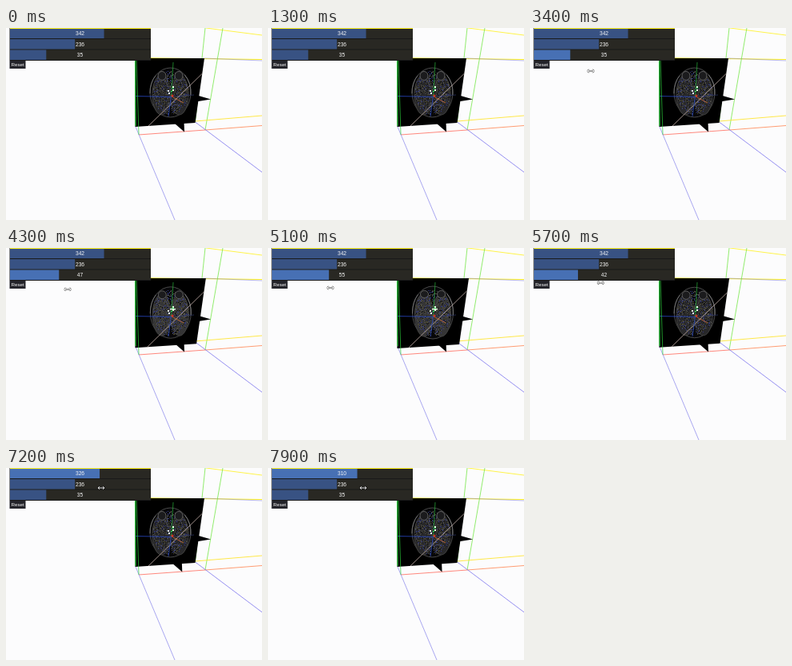
Animation, 320 px wide and 241 px high, one loop 8 s. Source, as an HTML page with a canvas:

```html
<!DOCTYPE html>
<html>
<head>
<meta charset="utf-8">
<style>
html, body { margin: 0; width: 100%; height: 100%; overflow: hidden; background: #fcfcfd; }
canvas { display: block; width: 320px; height: 241px; }
</style>
</head>
<body>
<canvas id="stage" width="320" height="241"></canvas>
<script>
const ctx = document.getElementById('stage').getContext('2d');
const LOOP = 8000;

// Keys are [time, value] pairs with linear motion between them.
function track(keys, t) {
  if (t <= keys[0][0]) return keys[0][1];
  for (let i = 1; i < keys.length; i++) {
    const [t0, a] = keys[i - 1], [t1, b] = keys[i];
    if (t <= t1) return a + (b - a) * (t - t0) / (t1 - t0);
  }
  return keys[keys.length - 1][1];
}

const sagittal = [[6500, 342], [7900, 310]];
const axial = [[3500, 35], [4800, 55], [5200, 55], [6000, 35]];
const cursorX = [[2700, 62], [3400, 76], [5100, 78], [5500, 78], [6300, 119]];
const cursorY = [[2700, 34], [3400, 54], [5100, 50], [5500, 50], [6300, 25]];

function line(color, x0, y0, x1, y1, width = 0.8) {
  ctx.strokeStyle = color;
  ctx.lineWidth = width;
  ctx.beginPath();
  ctx.moveTo(x0, y0);
  ctx.lineTo(x1, y1);
  ctx.stroke();
}

function poly(color, ...p) {
  ctx.fillStyle = color;
  ctx.beginPath();
  for (let i = 0; i < p.length; i += 2) ctx.lineTo(p[i], p[i + 1]);
  ctx.fill();
}

function oval(x, y, rx, ry, fill, stroke, from = 0, to = 7) {
  ctx.beginPath();
  ctx.ellipse(x, y, rx, ry, 0, from, to);
  if (fill) { ctx.fillStyle = fill; ctx.fill(); }
  if (stroke) { ctx.strokeStyle = stroke; ctx.lineWidth = 1; ctx.stroke(); }
}

function random(seed) {
  return () => (seed = seed * 16807 % 2147483647) / 2147483647;
}

function brain(k) {
  const x = 205.5 + k * 0.5, y = 81, rx = 25.5, ry = 31 + k * 2;
  oval(x, y, rx, ry, '#08080a', '#4a4a4a');
  // The skull is brightest along the upper sides.
  oval(x, y, rx, ry, null, '#777', -0.8, 0.1);
  oval(x, y, rx, ry, null, '#6c6c6c', 3.1, 3.9);
  for (const side of [-1, 1])
    oval(x + side * 11, y + 3, 11.5, 25 + k * 2, k > 0.5 ? '#353536' : '#28282a', '#41413f');

  const rnd = random(4217), tones = ['#343a80', '#51514c', '#494630', '#101012'];
  for (let i = 0; i < 850; i++) {
    const a = rnd() * 6.283, r = Math.sqrt(rnd()) * 0.88;
    ctx.fillStyle = tones[Math.floor(rnd() * 4)];
    ctx.fillRect(Math.round(x + Math.cos(a) * rx * r), Math.round(y + Math.sin(a) * ry * r), 1, 1);
  }

  for (const side of [-1, 1]) {
    const ex = x + side * 10.5;
    oval(ex, 60 - k * 2, 5, 5.5 - k, '#1b1b1d', '#5e5e5e');
    line('#55554f', ex - side * 4, 65, x + side * 3, 74);
  }
  poly('#08080a', x - 3, y + ry - 1, x, y + ry - 14, x + 3, y + ry - 1);
}

function slices(v1, k) {
  const shift = (v1 - 342) * 0.17;
  poly('#000', 211 + shift, 120, 223 + shift, 130.5, 222.5 + shift, 117);
  poly('#000', 234, 83, 256, 89.5, 231, 93.5);
  poly('#000', 161, 38, 248 + 3 * k, 38, 236.5 + 2.5 * k, 119 + 2 * k, 161.5, 124 + 2 * k);
  brain(k);

  // Where the three planes cross
  line('#2948c5', 162, 85.5, 207, 86.5);
  line('#354079', 207, 86, 235, 84, 0.6);
  line('#c4b0aa', 245.5 + 3 * k, 57 - 3 * k, 178 - 2 * k, 123 + 2 * k);
  line('#239b32', 209, 43, 206.5, 86);
  line('#2546b5', 206.5, 86, 203, 111);
  line('#d06d36', 207, 86, 222, 94);
  oval(208, 85, 1.6, 1.6, '#c83624');
  ctx.fillStyle = '#e4ffe4';
  for (const [x, y] of [[208, 73], [208, 77], [202, 78], [203, 81]])
    ctx.fillRect(x, y, 2, 2);
  if (k > 0.5) ctx.fillRect(205, 76, 7, 1.5);
  ctx.fillStyle = '#32e65a';
  ctx.fillRect(208, 75, 2, 1);
  ctx.fillRect(206, 79, 2, 1);
}

function box() {
  line('#fff21c', 250, 0, 320, 9);
  line('#fff21c', 162, 37.5, 320, 39.5, 1);
  line('#5555cf', 248, 38, 320, 41, 0.4);
  line('#77e84a', 249, 0, 236.5, 118);
  line('#77e84a', 271, 0, 249, 128);
  line('#ffe21c', 236.5, 117, 320, 110);
  line('#ff6a5c', 166, 134, 249, 128);
  line('#ff8450', 249, 128, 320, 122.5);
  line('#7b74ee', 236.5, 118, 320, 181);
  line('#8482ea', 162, 124, 211, 241, 0.7);
}

function label(text, x, y, align, size) {
  ctx.font = size + 'px "Liberation Sans", Arial, sans-serif';
  ctx.textAlign = align;
  ctx.textBaseline = 'middle';
  ctx.fillStyle = '#f6f6f6';
  ctx.fillText(text, x, y);
}

function slider(y, value, max, active) {
  ctx.fillStyle = '#292823';
  ctx.fillRect(5, y, 176, 12.5);
  ctx.fillStyle = active ? '#4770b4' : '#385283';
  ctx.fillRect(5, y, 176 * value / max, 12.5);
  label(Math.round(value), 92.5, y + 7, 'center', 6.7);
}

function panel(v1, v3, t) {
  ctx.fillStyle = '#191919';
  ctx.fillRect(4.5, 0, 176.5, 41);
  slider(0.5, v1, 512, t > 6200);
  slider(14, 236, 512, false);
  slider(27.5, v3, 136, t > 3200 && t < 6100);
  ctx.fillStyle = '#fff21c';
  ctx.fillRect(5, 0, 176, 1);
  ctx.fillStyle = '#24242a';
  ctx.fillRect(4.5, 41, 20, 10);
  label('Reset', 6.5, 45.8, 'left', 6.2);
}

function cursor(x, y) {
  const arrow = (color, w) => {
    line(color, x - 3.5, y, x + 3.5, y, w);
    for (const s of [-1, 1]) {
      line(color, x + s * 4, y, x + s * 2, y - 1.7, w);
      line(color, x + s * 4, y, x + s * 2, y + 1.7, w);
    }
  };
  arrow(y > 41 ? '#555' : '#111', 2);
  arrow('#fff', 0.9);
}

function draw(now) {
  const t = now % LOOP;
  const v1 = track(sagittal, t), v3 = track(axial, t), k = (v3 - 35) / 20;
  ctx.fillStyle = '#fcfcfd';
  ctx.fillRect(0, 0, 320, 241);
  box();
  slices(v1, k);
  line('#2bd03c', 161.5, 38, 162, 123, 1.2);
  line('#2bd03c', 163, 38, 166, 134, 0.7);
  panel(v1, v3, t);
  if (t >= 2700) cursor(track(cursorX, t), track(cursorY, t));
  requestAnimationFrame(draw);
}
requestAnimationFrame(draw);
</script>
</body>
</html>
```
